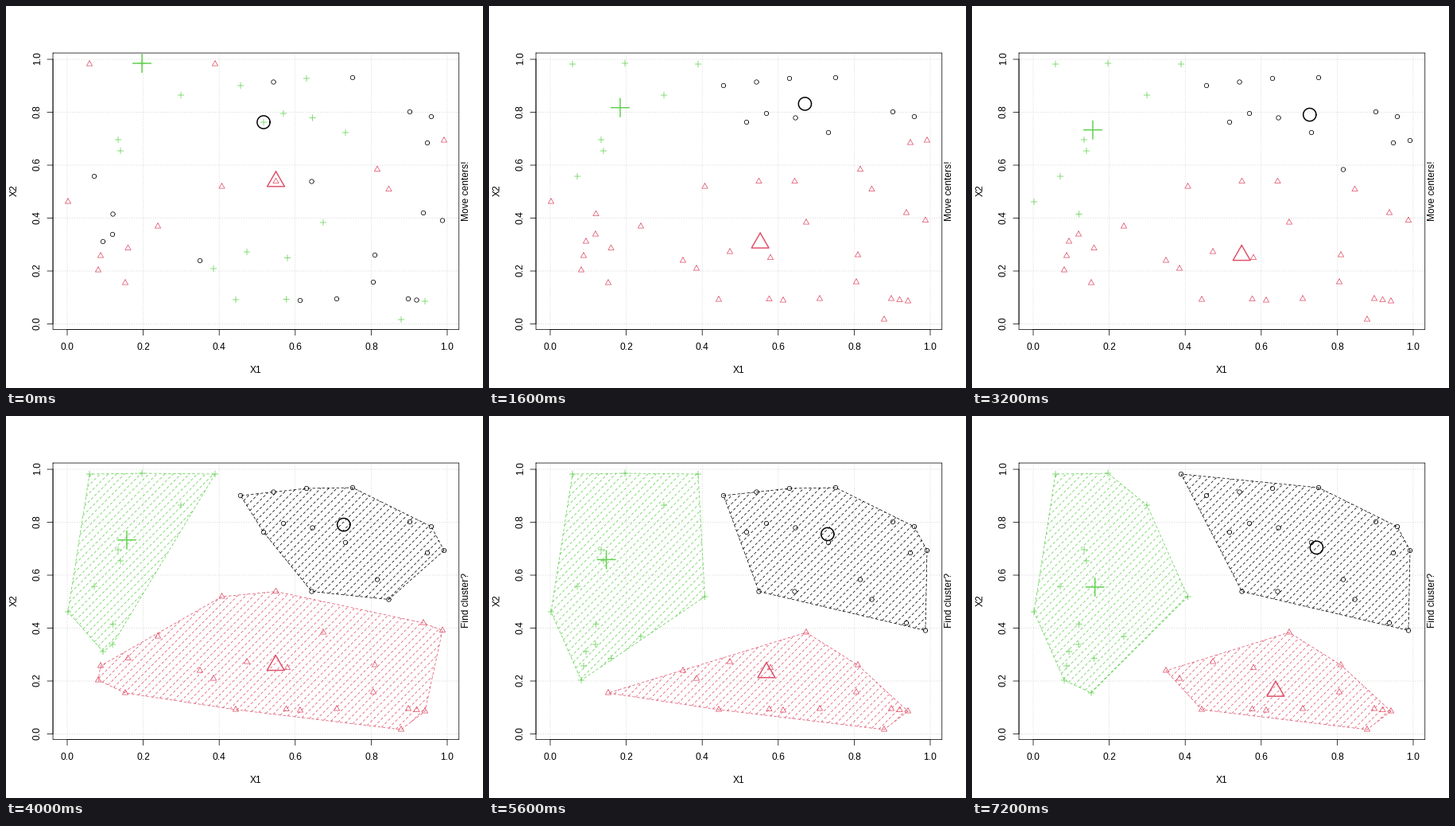
A matplotlib script that plays this animation: 600 px wide and 480 px high, repeating every 8000 ms.

```python
import numpy as np
import matplotlib.pyplot as plt
from matplotlib.animation import FuncAnimation
from matplotlib.collections import LineCollection

plt.rcParams["font.family"] = "Liberation Sans"

PX = 0.72                      # points per pixel at 100 dpi
THIN, THICK = 0.75 * PX, 1.5 * PX
MARKS = "o^+"
COLORS = ["black", "#DF536B", "#61D04F"]
HINTS = ["Move centers!", "Find cluster?"]
LEFT, RIGHT, TOP, BOTTOM = 59.04, 569.76, 59.04, 406.56
MIDDLE = (LEFT + RIGHT) / 2, (TOP + BOTTOM) / 2
ORIGIN = np.array([77.0, 399.5])
UNIT = np.array([478.0, 332.5])
HATCH_GAP = 7.2 * np.sqrt(2)

# Pixel positions; a chain also has a point halfway along each link.
CHAINS = [
    [(122, 296), (116, 332), (191, 277), (78, 246), (144, 182), (399, 272),
     (535, 139)],
    [(436, 90), (527, 371), (506, 368), (263, 73), (416, 368), (289, 369)],
    [(220, 112), (551, 169)],
    [(295, 100), (378, 91)],
    [(244, 320), (464, 313)],
    [(324, 146), (530, 172)],
]
LOOSE = [(508, 133), (525, 260), (549, 269.5), (134, 287), (462, 347),
         (370, 370), (105, 73), (150, 348), (171, 72), (349, 135), (141, 168),
         (303, 309), (261, 330), (497, 394)]
# The arbitrary first clusters, point by point.
FIRST_MARKS = ("o^^^^o^o+^+^o" "o^+ooo^^o++" "++^" "+o+" "o+o" "++o"
               "oooooo^^++++++")
FIRST_CENTERS = np.array([(324, 146), (339.5, 220.5), (171, 72)])


def with_halves(chain):
    chain = np.array(chain, float)
    out = np.repeat(chain, 2, axis=0)[:-1]
    out[1::2] = (chain[1:] + chain[:-1]) / 2
    return out


POINTS = np.vstack([with_halves(c) for c in CHAINS] + [LOOSE])


def kmeans_steps(rounds=5):
    """Alternate 'move centers' and 'find cluster' states."""
    labels = np.array([MARKS.index(m) for m in FIRST_MARKS])
    centers = FIRST_CENTERS
    steps = []
    for i in range(rounds):
        if i:
            centers = np.array([POINTS[labels == k].mean(0) for k in range(3)])
        steps.append((labels, centers))
        gaps = (POINTS[:, None] - centers) / UNIT
        labels = (gaps ** 2).sum(2).argmin(1)
        steps.append((labels, centers))
    return steps


def symbol(kind, cex):
    """Strokes of a plotting symbol centred on zero."""
    r = 2.7 * cex
    if kind == 0:
        a = np.linspace(0, 2 * np.pi, 49)
        return [r * np.column_stack([np.cos(a), np.sin(a)])]
    if kind == 1:
        a = np.radians([-90, 30, 150, 270])
        return [1.5551 * r * np.column_stack([np.cos(a), np.sin(a)])]
    d = r * np.sqrt(2)
    return [np.array([(-d, 0), (d, 0)]), np.array([(0, -d), (0, d)])]


def turn(a, b, c):
    return (b[0] - a[0]) * (c[1] - a[1]) - (b[1] - a[1]) * (c[0] - a[0])


def hull(points):
    """Closed convex outline, clockwise from the rightmost point."""
    pts = sorted(map(tuple, points))

    def half(seq):
        out = []
        for p in seq:
            while len(out) > 1 and turn(out[-2], out[-1], p) <= 0:
                out.pop()
            out.append(p)
        return out

    return np.array(half(pts[::-1]) + half(pts)[1:])


def hatch(outline):
    """Rising 45 degree lines inside a convex outline."""
    # Each line has a constant value of u = x + y.
    u = outline.sum(1) - ORIGIN.sum()
    lines = []
    for c in np.arange(np.ceil(u.min() / HATCH_GAP),
                       np.floor(u.max() / HATCH_GAP) + 1) * HATCH_GAP:
        ends = [outline[i] + (c - u[i]) / (u[i + 1] - u[i])
                * (outline[i + 1] - outline[i])
                for i in range(len(u) - 1) if (u[i] <= c) != (u[i + 1] <= c)]
        if len(ends) == 2:
            lines.append(np.array(sorted(ends, key=lambda p: p[0])))
    return lines


fig = plt.figure(figsize=(6, 4.8), dpi=100, facecolor="white")
ax = fig.add_axes([0, 0, 1, 1])
ax.set_xlim(0, 600)
ax.set_ylim(480, 0)
ax.axis("off")


def strokes(color, width, style="solid", z=3):
    lines = LineCollection([], colors=color, linewidths=width,
                           linestyles=style, capstyle="round",
                           joinstyle="round", snap=False, zorder=z)
    ax.add_collection(lines, autolim=False)
    return lines


def label(x, y, text, upright=True):
    if not upright:
        # Turned text is rasterised one pixel low and left.
        x, y = x + 1, y - 1
    return ax.text(x, y, text, fontsize=12 * PX, ha="center", va="baseline",
                   rotation=0 if upright else 90, rotation_mode="anchor")


def draw_axes():
    grid, frame = [], []
    for i in range(6):
        x = ORIGIN[0] + UNIT[0] * i / 5
        y = ORIGIN[1] - UNIT[1] * i / 5
        grid += [[(x, BOTTOM), (x, TOP)], [(LEFT, y), (RIGHT, y)]]
        frame += [[(x, BOTTOM), (x, BOTTOM + 7.2)],
                  [(LEFT, y), (LEFT - 7.2, y)]]
        label(x, 432.5, f"{i / 5:.1f}")
        label(41.8, y, f"{i / 5:.1f}", upright=False)
    frame += [[(LEFT, TOP), (RIGHT, TOP), (RIGHT, BOTTOM), (LEFT, BOTTOM),
               (LEFT, TOP)],
              [(LEFT, ORIGIN[1]), (LEFT, ORIGIN[1] - UNIT[1])],
              [(ORIGIN[0], BOTTOM), (ORIGIN[0] + UNIT[0], BOTTOM)]]
    strokes("lightgray", THIN, (0, (1, 3)), 1).set_segments(grid)
    strokes("black", THIN, z=2).set_segments(frame)
    label(MIDDLE[0], 461.3, "X1")
    label(13, MIDDLE[1], "X2", upright=False)


draw_axes()
hint = label(581.3, MIDDLE[1], "", upright=False)
small = [strokes(c, THIN) for c in COLORS]
large = [strokes(c, THICK) for c in COLORS]
areas = [strokes(c, THIN, (0, (4, 4))) for c in COLORS]
STEPS = kmeans_steps()


def draw(frame):
    labels, centers = STEPS[frame]
    finding = frame % 2
    hint.set_text(HINTS[finding])
    for k in range(3):
        members = POINTS[labels == k]
        small[k].set_segments([p + s for p in members for s in symbol(k, 1)])
        large[k].set_segments([centers[k] + s for s in symbol(k, 3)])
        outline = hull(members)
        areas[k].set_segments(hatch(outline) + [outline] if finding else [])
    return [hint, *small, *large, *areas]


anim = FuncAnimation(fig, draw, frames=len(STEPS), interval=800, repeat=True)
plt.show()
```
